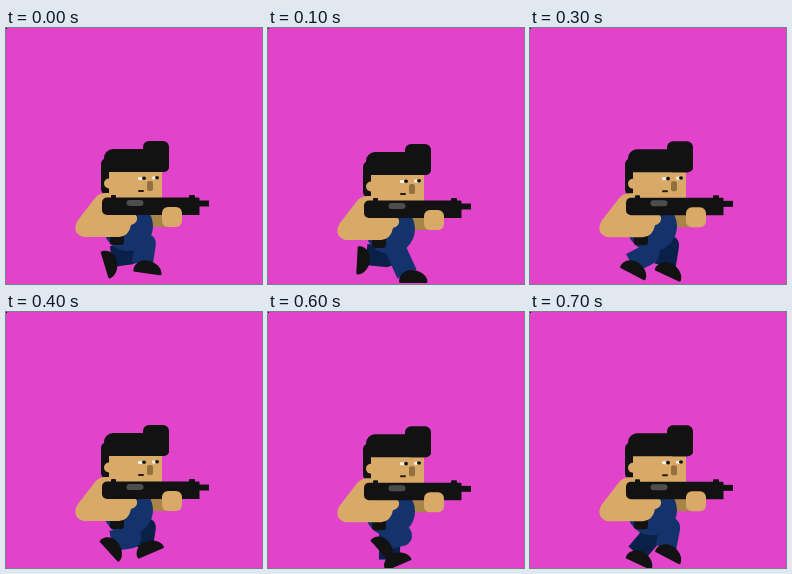
Animation of 256 by 256 pixels, one loop 0.8 s. Source, as an HTML page with a canvas:

```html
<!DOCTYPE html>
<html lang="en">
<head>
<meta charset="utf-8">
<title>Run cycle</title>
<style>
html, body { margin: 0; width: 100%; height: 100%; overflow: hidden; background: #e243cb; }
canvas { display: block; width: 256px; height: 256px; }
</style>
</head>
<body>
<canvas id="stage" width="256" height="256"></canvas>
<script>
const ctx = document.getElementById('stage').getContext('2d');
const PINK = '#e243cb', INK = '#121212', SKIN = '#d8a967', SHADE = '#a98448';
const BLUE = '#14336c', NAVY = '#0b2048';
const STEP = 100, STEPS = 8;
const BONE = 20, SOLE = 29;

// Sole centre at contact, push-off, kick and reach; pitch and swing in degrees
const near = {
  color: BLUE, shift: 0, pitch: 28, swing: 28,
  path: [[145, 255], [102, 246], [103, 243], [137, 246]]
};
const far = {
  color: NAVY, shift: STEPS / 2, pitch: 25, swing: 68,
  path: [[153, 245], [108, 252], [89, 232], [137, 248]]
};

function box(x, y, w, h, r, color) {
  ctx.fillStyle = color;
  ctx.beginPath();
  ctx.roundRect(x, y, w, h, r);
  ctx.fill();
}

function oval(x, y, rx, ry, color) {
  ctx.fillStyle = color;
  ctx.beginPath();
  ctx.ellipse(x, y, rx, ry, 0, 0, Math.PI * 2);
  ctx.fill();
}

const lerp = (a, b, u) => a + (b - a) * u;

// The body drops on each landing, then rises back
function bob(step) {
  const since = (step + 3) % 4;
  return 3 * (1 - since / 3) ** 2;
}

function footPose({ path, shift, pitch, swing }, step) {
  const q = (step + shift + STEPS - 1) % STEPS / 2;
  const i = Math.floor(q), u = q - i;
  const [x0, y0] = path[i], [x1, y1] = path[(i + 1) % path.length];
  const ease = i === 2 ? u * u : u;
  const lift = (i === 0 ? -5 : 5) * Math.sin(Math.PI * u);
  return {
    x: lerp(x0, x1, ease),
    y: lerp(y0, y1, ease) - lift,
    angle: (pitch - swing * Math.cos(q * Math.PI / 2)) * Math.PI / 180
  };
}

function foot({ x, y, angle }) {
  const r = SOLE / 2;
  ctx.save();
  ctx.translate(x, y);
  ctx.rotate(angle);
  ctx.fillStyle = INK;
  ctx.beginPath();
  ctx.moveTo(1 - r, 0);
  ctx.bezierCurveTo(-1 - r, -5, 4 - r, -13, 13 - r, -13);
  ctx.bezierCurveTo(22 - r, -13, r, -7, r, -1);
  ctx.quadraticCurveTo(r, 0, r - 2, 0);
  ctx.closePath();
  ctx.fill();
  ctx.restore();
}

// Two equal bones from hip to ankle, with the knee bent forwards
function leg(side, step) {
  const pose = footPose(side, step);
  const c = Math.cos(pose.angle), s = Math.sin(pose.angle);
  const hx = 122, hy = 206 + bob(step);
  const ax = pose.x - 6 * c + 9 * s, ay = pose.y - 6 * s - 9 * c;
  const d = Math.hypot(ax - hx, ay - hy);
  const bend = Math.sqrt(Math.max(0, BONE * BONE - d * d / 4)) / d;

  ctx.strokeStyle = side.color;
  ctx.lineWidth = 21;
  ctx.lineJoin = 'round';
  ctx.beginPath();
  ctx.moveTo(hx, hy);
  ctx.lineTo((hx + ax) / 2 + (ay - hy) * bend, (hy + ay) / 2 - (ax - hx) * bend);
  ctx.lineTo(ax, ay);
  ctx.stroke();
  foot(pose);
}

function eye(x, y, pupil) {
  box(x, y, pupil - x, 3, 1, '#f4eee4');
  oval(pupil, y + 1.3, 2, 1.8, INK);
}

function head() {
  box(95, 130, 14, 37, 6, INK);
  box(103, 138, 53, 36, 2, SKIN);
  box(98, 121, 65, 23, [9, 4, 5, 3], INK);
  box(137, 113, 26, 31, 6, INK);
  oval(103, 155.5, 5, 5, SKIN);
  eye(132, 149, 138);
  eye(146, 148.4, 151);
  box(141, 153, 6, 10, 2, '#94703f');
  box(132, 162, 6, 2, 1, '#2a1c10');
}

function arm() {
  ctx.fillStyle = SKIN;
  ctx.beginPath();
  ctx.moveTo(98, 165);
  ctx.quadraticCurveTo(92, 166, 89, 170);
  ctx.lineTo(72, 192);
  ctx.bezierCurveTo(66, 201, 71, 209, 80, 209);
  ctx.lineTo(113, 209);
  ctx.quadraticCurveTo(123, 208, 125, 197);
  ctx.quadraticCurveTo(132, 195, 131, 189);
  ctx.lineTo(128, 184);
  ctx.lineTo(112, 178);
  ctx.lineTo(106, 165);
  ctx.fill();
}

function gun() {
  box(96, 169.5, 97.5, 17.5, [5, 1, 0, 5], INK);
  box(105, 167, 5, 5, 1, INK);
  box(183, 167, 6, 5, 1, INK);
  box(190, 172.5, 13, 6, 0, INK);
  box(120.5, 172, 17, 6, 3, '#4d4d4d');
}

function draw(step) {
  ctx.fillStyle = PINK;
  ctx.fillRect(0, 0, 256, 256);
  ctx.fillStyle = INK;
  ctx.fillRect(0, 0, 1, 1);

  leg(far, step);
  leg(near, step);

  ctx.save();
  ctx.translate(0, bob(step));
  box(142, 184, 22, 15, 4, SHADE);
  oval(122, 198, 25, 25, BLUE);
  head();
  box(104, 200, 14, 17, 3, INK);
  arm();
  gun();
  box(156, 179, 20, 20, 6, SKIN);
  ctx.restore();
}

function tick() {
  draw(Math.floor(performance.now() / STEP) % STEPS);
  requestAnimationFrame(tick);
}
tick();
</script>
</body>
</html>
```
